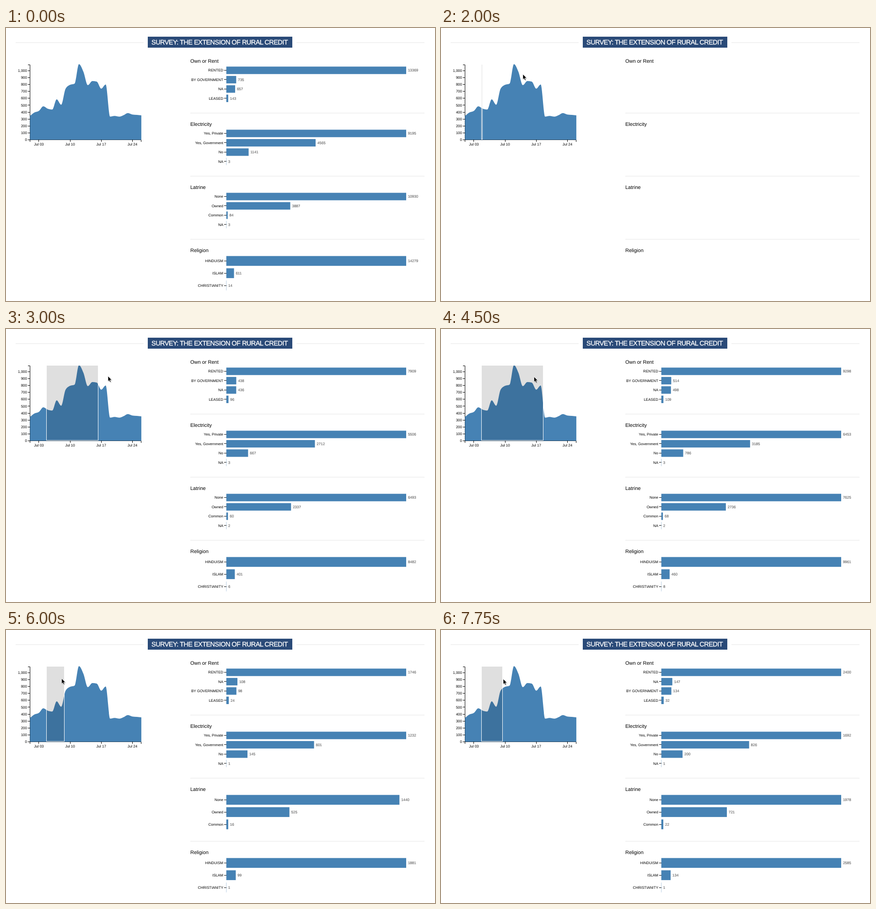
An HTML page that plays this animation: 938 by 597 pixels, repeating every 8 s.

```html
<!DOCTYPE html>
<html lang="en">
<head>
<meta charset="utf-8">
<title>Survey dashboard</title>
<style>
  html, body { margin: 0; width: 100%; height: 100%; overflow: hidden; background: #fff; }
  svg { display: block; width: 100%; height: 100%; font: 8px "Liberation Sans", Arial, sans-serif; text-rendering: geometricPrecision; }
  .end { text-anchor: end; }
  .mid { text-anchor: middle; }
  .head { font-size: 11px; }
  .title { font-size: 14.5px; letter-spacing: -.54px; fill: #fff; stroke: #fff; stroke-width: .35px; }
  .value { fill: #666; stroke: #666; stroke-width: .15px; }
  .axis { fill: none; stroke: #000; }
  .rule { fill: none; stroke: #e4e4e4; }
  .blue { fill: #4682b4; }
  .navy { fill: #2a4a78; }
  .brush { fill: #000; fill-opacity: .125; stroke: #fff; }
</style>
</head>
<body>
<svg viewBox="0 0 938 597">
  <g id="fixed"></g>
  <g id="bars"></g>
  <g id="brush"></g>
  <g id="cursor">
    <path d="M1 1.5V13l2.8-2.4 1.8 4 2-.9-1.7-3.8h3.6z" fill="#000" opacity=".22"/>
    <path d="M0 0V11.6l2.6-2.4 1.8 4 2-.9-1.8-3.9h3.6z" fill="#000" stroke="#fff" stroke-width=".8"/>
  </g>
</svg>
<script>
const LOOP = 8000, STEP = 250;
const $ = id => document.getElementById(id);
const text = (x, y, str, cls = "") => `<text x="${x}" y="${y}" class="${cls}">${str}</text>`;
const path = (d, cls) => `<path d="${d}" class="${cls}"/>`;
const rect = (x, y, w, h, cls) => `<rect x="${x}" y="${y}" width="${w}" height="${h}" class="${cls}"/>`;
const sum = list => list.reduce((a, b) => a + b, 0);

// Interviews per day, from 1 July
const daily = [345, 395, 418, 485, 450, 438, 585, 508, 740, 795, 812, 1095, 985,
  792, 850, 842, 740, 800, 335, 345, 335, 355, 386, 365, 360, 353];
const everyone = sum(daily);
const dayX = day => 52.4 + (day - 1) * 9.74;
const countY = n => 244.4 - n * .151;

// Each answer: label, overall count, weight among the early interviews
const charts = [
  ["Own or Rent", ["RENTED", 13369, .98], ["BY GOVERNMENT", 735, 1], ["NA", 657, 1.28], ["LEASED", 143, 1.3]],
  ["Electricity", ["Yes, Private", 9195, 1.01], ["Yes, Government", 4565, .99], ["No", 1141, .95], ["NA", 3, 3]],
  ["Latrine", ["None", 10930, .99], ["Owned", 3887, 1.02], ["Common", 84, 1.5], ["NA", 3, .8]],
  ["Religion", ["HINDUISM", 14279, .99], ["ISLAM", 611, 1.25], ["CHRISTIANITY", 14, .25]]
];
const PITCH = 138, BAR_X = 481.7, BAR_W = 393.3;

// Pointer: step, x, y; the selection's right edge lags one step behind
const BRUSH_X = 88.5, PRESS = 7;
const moves = [[4, 130, 27], [PRESS, 89.5, 101], [8, 179, 101], [11, 201, 102], [12, 223, 103],
  [17, 223, 104], [20, 164, 105], [21, 143, 105], [23, 127, 106], [24, 121.6, 106],
  [26, 120, 106], [28, 115, 107], [30, 134, 107], [31, 136, 107]];

function pointer(step) {
  if (step === 1) return [537, -6];
  const i = moves.findIndex(m => m[0] >= step);
  if (step < moves[0][0]) return null;
  const b = moves[i], a = moves[i - 1] ?? b;
  const k = (step - a[0]) / (b[0] - a[0] || 1);
  return [1, 2].map(j => a[j] + (b[j] - a[j]) * k);
}

const brushEnd = step => step > PRESS ? pointer(step - 1)[0] : 0;

// Share of all interviews on days that start inside the selection
function selected(step) {
  const end = brushEnd(step);
  if (!end) return 1;
  return sum(daily.filter((_, i) => dayX(i + 1) > BRUSH_X && dayX(i + 1) <= end)) / everyone;
}

function rowsAt([, ...answers], step) {
  const part = selected(step);
  return answers
    .map(([label, count, early]) => ({ label, n: Math.round(count * part * (1 + (early - 1) * (1 - part))) }))
    .filter(r => r.n > 0)
    .sort((a, b) => b.n - a.n);
}

// Bars grow in again after a chart has lost a row
function growth(chart, step) {
  for (const age of [0, 1]) {
    if (rowsAt(chart, step - age).length < rowsAt(chart, step - age - 1).length) return 1 - .15 / 4 ** age;
  }
  return 1;
}

function barsAt(step) {
  let out = "";
  charts.forEach((chart, c) => {
    const rows = rowsAt(chart, step), grow = growth(chart, step);
    const gap = 85.8 / (rows.length + .2), h = gap * .8;
    const middle = c * PITCH + (rows.length > 3 ? 123.2 : 122.2);
    rows.forEach((r, i) => {
      const y = middle + (i - (rows.length - 1) / 2) * gap;
      const w = BAR_W * r.n / rows[0].n * grow;
      out += rect(BAR_X, y - h / 2, Math.max(w, .4), h, "blue") +
        path(`M477 ${Math.floor(y) + .5}h5`, "axis") +
        text(475, y + 2.8, r.label, "end") +
        text(BAR_X + w + 3.9, y + 2.8, r.n, "value");
    });
  });
  return out;
}

// Monotone cubic through the daily counts
function areaPath() {
  const slope = daily.slice(1).map((v, i) => v - daily[i]);
  const tangent = daily.map((_, i) => {
    const a = slope[i - 1] ?? slope[i], b = slope[i] ?? a;
    return (Math.sign(a) + Math.sign(b)) * Math.min(Math.abs(a), Math.abs(b), Math.abs(a + b) / 4);
  });
  const pt = (day, n) => `${dayX(day).toFixed(2)} ${countY(n).toFixed(2)}`;
  let d = `M${pt(1, 0)}L${pt(1, daily[0])}`;
  for (let i = 1; i < daily.length; i++) {
    d += `C${pt(i + 1 / 3, daily[i - 1] + tangent[i - 1] / 3)} ` +
      `${pt(i + 2 / 3, daily[i] - tangent[i] / 3)} ${pt(i + 1, daily[i])}`;
  }
  return d + `L${pt(daily.length, 0)}Z`;
}

function drawFixed() {
  let out = path("M21 32H301M635 32H915", "rule") +
    rect(310, 19, 316, 24, "navy") +
    text(318, 36, "SURVEY: THE EXTENSION OF RURAL CREDIT", "title") +
    path("M48 80.5H52.5V244.5H48M52.5 249V244.5H295.5V249", "axis") +
    path(areaPath(), "blue");
  for (let n = 0; n <= 1000; n += 100) {
    const y = countY(n);
    out += path(`M48 ${Math.floor(y) + .5}h5`, "axis") +
      text(46, y + 2.6, n.toLocaleString("en-US"), "end");
  }
  for (let day = 3; day < daily.length; day += 7) {
    const x = dayX(day);
    out += path(`M${Math.floor(x) + .5} 244v5`, "axis") +
      text(x, 257, "Jul " + String(day).padStart(2, "0"), "mid");
  }
  charts.forEach(([name], c) => {
    out += text(403, 76 + c * PITCH, name, "head");
    if (c) out += path(`M403 ${48 + c * PITCH}H915`, "rule");
  });
  $("fixed").innerHTML = out;
}

function draw(step) {
  const p = pointer(step), end = brushEnd(step);
  $("cursor").setAttribute("visibility", p ? "visible" : "hidden");
  if (p) $("cursor").setAttribute("transform", `translate(${p})`);
  $("brush").innerHTML = end ? rect(BRUSH_X, 79.5, Math.round(end) + .5 - BRUSH_X, 164, "brush") : "";
  $("bars").innerHTML = barsAt(step);
}

drawFixed();
let shown = -1;
const began = performance.now();
function tick() {
  const step = Math.floor((performance.now() - began) % LOOP / STEP);
  if (step !== shown) draw(shown = step);
  requestAnimationFrame(tick);
}
tick();
</script>
</body>
</html>
```
